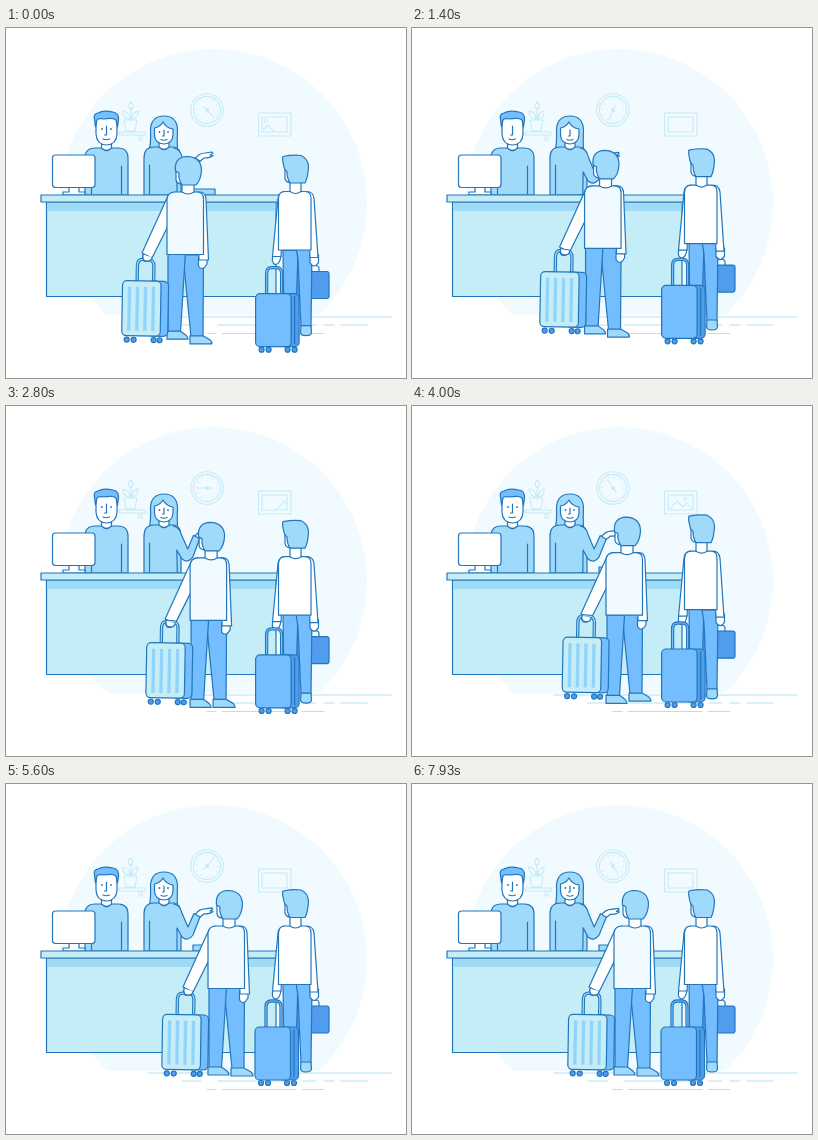
An HTML page that plays this animation: 400x350 px, repeating every 8 s.

```html
<!DOCTYPE html>
<html lang="en">
<head>
<meta charset="utf-8">
<title>Reception desk</title>
<style>
  html, body { margin: 0; width: 100%; height: 100%; overflow: hidden; background: #fff; }
  svg { display: block; width: 100vw; height: 100vh; }
  .ink { stroke: #2276bc; stroke-width: 1.2; stroke-linecap: round; stroke-linejoin: round; fill: none; }
  .faint { stroke: #c6eaf8; stroke-width: 1.1; stroke-linecap: round; stroke-linejoin: round; fill: none; }
  .ink .w { fill: #fff; }
  .ink .mist { fill: #f1faff; }
  .ink .sky { fill: #a0dafb; }
  .ink .pale { fill: #c5edf8; }
  .ink .blue { fill: #74bdff; }
  .ink .deep { fill: #519cec; }
  .bare { stroke: none; }
</style>
</head>
<body>
<svg viewBox="0 0 400 350" xmlns="http://www.w3.org/2000/svg">
  <defs>
    <clipPath id="ground"><rect width="400" height="287"/></clipPath>
    <clipPath id="canvas"><rect x="256" y="89" width="25" height="15"/></clipPath>
  </defs>

  <circle cx="207" cy="175" r="154" fill="#f1fbff" clip-path="url(#ground)"/>

  <g class="faint">
    <!-- clock -->
    <circle cx="201" cy="82" r="16.3"/>
    <circle cx="201" cy="82" r="13.6"/>
    <circle cx="201" cy="82" r="11" stroke-dasharray="1 4.76" stroke-linecap="butt" stroke-width="1.5"/>
    <g id="clockHand"><path d="M201 87V72"/><circle cx="201" cy="82" r="1.3" fill="#c6eaf8"/></g>
    <!-- picture -->
    <rect x="252.500" y="85" width="32.500" height="23"/>
    <rect x="256" y="89" width="25" height="15"/>
    <g clip-path="url(#canvas)"><g id="mountains">
      <path d="M257 104L265 95L271 101L275 97L281 104"/><circle cx="273" cy="93" r="1.500"/>
    </g></g>
    <!-- shelf and plant -->
    <path d="M113 104H139V107H113ZM133 107V112H136V107M118 92H131L129 103H120Z"/>
    <g id="plant">
      <path d="M125 92V80M125 82C121 79 123 76 125 74C127 76 129 79 125 82M124 91C117 90 117 86 117 83C122 84 124 87 124 91M126 91C132 90 132 86 132 83C127 84 126 87 126 91"/>
    </g>
    <!-- floor -->
    <path d="M142 289H385M176 297H195M212 297H285M297 297H310M318 297H328M335 297H361M201 305.500H210M216 305.500H290M296 305.500H318" stroke="#b3e2f6"/>
  </g>

  <!-- clerk -->
  <g class="ink">
    <path class="sky" d="M79 167V130Q79 120 89 120H112Q122 120 122 130V167Z"/>
    <path d="M85.500 138V166M115.500 138V166"/>
    <path class="w" d="M95.500 113V120Q100.500 125 105.500 120V113Z"/>
    <path class="w" d="M90 90V106Q90.500 116.500 100.500 117Q110.500 116.500 111 106V90Z"/>
    <path class="blue" d="M89.500 99L88.500 91Q87 86 92 85Q97 82 107 84Q113 85 112.500 92L111.500 99L110 92Q107 89.500 98 91Q92 90 91 92Z"/>
    <path d="M100.500 98V107H98.500M97 111Q100 112.500 103.500 111"/>
    <g class="eyes bare" fill="#2276bc"><circle cx="96" cy="101" r="0.900"/><circle cx="105" cy="101" r="0.900"/></g>
  </g>

  <!-- receptionist -->
  <g class="ink">
    <path class="sky" d="M143.500 121Q145 114 144.500 102Q145 88 158 88Q171 88 171.500 102Q171 114 171.500 121Z"/>
    <path class="sky" d="M138 167V130Q138 119 148 119H168Q175 120 175 130V167Z"/>
    <path class="w" d="M153 113V119Q158 124 163 119V113Z"/>
    <path class="w" d="M148.500 100V107Q149 115.500 158 116Q166.500 115.500 167 107V101Q160 100 157 94Q154 99 148.500 100Z"/>
    <path d="M158 102V108H156.500M155 111.500Q158 113 161 111.500M143.500 137V166"/>
    <g class="eyes bare" fill="#2276bc"><circle cx="153.500" cy="104" r="0.900"/><circle cx="162" cy="104" r="0.900"/></g>
    <g id="wave">
      <path class="w" d="M189 131Q193 125 199 125L206 124Q208 125 204 127L207 127.500Q204 130 198 130L193 134Z"/>
      <path class="sky" d="M168 120Q174 121 176 129L182 143L188 129.500L194 133L187 151Q182 158 176 153L171 144V167H168"/>
    </g>
  </g>

  <!-- desk -->
  <g class="ink">
    <path class="w" d="M63 159V164H57V167H79V164H73V159Z"/>
    <rect class="w" x="46.500" y="127" width="42.500" height="32.500" rx="3"/>
    <path class="sky" d="M187 161H209V167H187Z"/>
    <path class="pale" d="M40.500 174H270V268.500H40.500Z"/>
    <path class="bare" fill="#9fdbf7" d="M41.100 175H269.300V183H41.100Z"/>
    <path class="pale" d="M35 167H276V174H35Z"/>
  </g>

  <!-- guest with the striped case -->
  <g class="ink" id="guestA">
    <g id="legAR">
      <path class="blue" d="M217 203H238.500L238 285H226L219 214Z"/>
      <path class="sky" d="M225 292V284H238L245 288Q247 290 247 292Z"/>
    </g>
    <g id="legAL">
      <path class="blue" d="M203 203H220.500L215.500 284H203Z"/>
      <path class="sky" d="M202 291V283H215.500L221 287Q223 289 223 291Z"/>
    </g>
    <path class="w" d="M233.500 207V216Q237.500 222 242 214V207Z"/>
    <path class="w" d="M232 142H235Q240.500 142 241 149L243.500 210H234Z"/>
    <path class="w" d="M179 203Q176 208 179 211Q184 213 187 207L188 203Z"/>
    <path class="w" d="M210 142Q204 142 202 148L177 203L187 208L205 172Z"/>
    <path class="mist" d="M202 204.500V149Q203 142 210 142H232Q238.500 142 238.500 149V204.500Z"/>
    <path class="w" d="M217 129V142Q223 146 229 142V129Z"/>
    <path class="w" d="M211 118V130Q212 134 217 134H222V118Z"/>
    <path class="sky" d="M210.500 121Q209 107 222 106.500Q236 107 236.500 120Q236 130 231 135H217Q213 129 214 123Z"/>
  </g>
  <g class="ink" id="caseA">
    <path id="grip" d="M171.500 232V216Q171.500 209.500 177 209.500H182Q188 209.500 188 216V232" stroke-width="3.300"/>
    <path d="M171.500 232V216Q171.500 209.500 177 209.500H182Q188 209.500 188 216V232" stroke="#a0dafb" stroke-width="1.200"/>
    <g class="deep"><circle cx="162" cy="290" r="2.500"/><circle cx="169" cy="290" r="2.500"/><circle cx="189" cy="290" r="2.500"/><circle cx="195" cy="290" r="2.500"/></g>
    <rect class="blue" x="183" y="231" width="20" height="55" rx="4.500"/>
    <rect class="pale" x="157" y="231" width="38.500" height="55" rx="4.500"/>
    <path d="M164 237V281M172 237V281M180 237V281M188 237V281" stroke="#92d3fa" stroke-width="3.300" stroke-linecap="butt"/>
  </g>
  <g class="ink" id="fingers"><path class="w" d="M178 205Q177 211 182 211Q187 211 187 207"/></g>

  <!-- guest with the briefcase -->
  <g class="ink" id="guestB">
    <path d="M300 222V219Q300 216 304 216H309Q313 216 313 219V222"/>
    <rect class="deep" x="287" y="222" width="36" height="27" rx="2.500"/>
    <g id="legBL">
      <path class="blue" d="M277 199H292L289.500 280H278Z"/>
      <path class="sky" d="M278 279H289.500V285Q284 290 278 285Z"/>
    </g>
    <g id="legBR">
      <path class="blue" d="M290 199H306L305 279H295L292 212Z"/>
      <path class="sky" d="M295 278H305L305.500 285Q305 288 300 288Q295 288 294.500 285Z"/>
    </g>
    <path class="w" d="M304 205V213Q308 220 312.500 213V205Z"/>
    <path class="w" d="M301 142Q307 142 308 149L312 208H304Z"/>
    <path class="w" d="M267 206Q265 213 269 215Q274 215 275 206Z"/>
    <path class="w" d="M279 142Q273 142 272 149L266.500 207H275Z"/>
    <path class="w" d="M272.500 200.500V149Q273 142 279 142H299Q305 142 305 149V200.500Z"/>
    <path class="w" d="M284 129V142Q289.500 146 295 142V129Z"/>
    <path class="w" d="M279 117V129Q280 133 284 133H290V117Z"/>
    <path class="sky" d="M277.500 115Q276 109 277 107Q287 105 295 106Q302 109 302.500 117Q302 128 299 133.500H284Q281 129 281 122Q278 120 277.500 115Z"/>
  </g>
  <g class="ink" id="caseB">
    <path d="M260 243V223Q260 217 265 217H270Q275 217 275 223V243" stroke-width="3.300"/>
    <path d="M260 243V223Q260 217 265 217H270Q275 217 275 223V243" stroke="#74bdff" stroke-width="1.200"/>
    <g class="deep"><circle cx="255" cy="299" r="2.500"/><circle cx="262" cy="299" r="2.500"/><circle cx="281" cy="299" r="2.500"/><circle cx="288" cy="299" r="2.500"/></g>
    <rect class="deep" x="272" y="243" width="20.500" height="53" rx="4.500"/>
    <path d="M288 246V293"/>
    <rect class="blue" x="249" y="243" width="35.500" height="53" rx="4.500"/>
  </g>
</svg>

<script>
  const LOOP = 8, FPS = 15, STRIDE = 1.643;
  const $ = id => document.getElementById(id);
  const set = (id, value) => $(id).setAttribute('transform', value);
  const move = (id, x, y) => set(id, `translate(${x.toFixed(2)} ${y.toFixed(2)})`);

  // Piecewise linear value through [time, value] points.
  function track(points, t) {
    const i = points.findIndex(p => p[0] > t);
    if (i < 0) return points[points.length - 1][1];
    if (i === 0) return points[0][1];
    const [t0, a] = points[i - 1], [t1, b] = points[i];
    return a + (b - a) * (t - t0) / (t1 - t0);
  }

  const bodyX = [[0, -41], [4, -8], [4.95, 0]];
  const bodyY = [[0, 22], [4, 4.7], [4.95, 0]];
  const followerY = [[0, 21.5], [4.7, 0]];
  const caseX = [[0, -40], [4, -5.5], [4.7, -1], [5, 0]];
  const caseY = [[0, 22], [1.4, 13], [2.8, 6], [4, 0.5], [4.6, -0.3]];
  const trolleyY = [[0, 22.7], [3.8, 0]];
  const sceneX = [[0, -13], [1, -28], [1.01, 30], [2.8, 13], [4, 0], [4.73, -27], [6.6, -28], [6.61, 30], [8, 22]];
  const blinks = [1.3, 4.9, 6.4, 7.4];

  function draw(t) {
    const walking = Math.min(1, Math.max(0, (4.95 - t) / 0.3));
    const step = -1.8 * Math.cos(2 * Math.PI * t / STRIDE) * walking;
    const x = track(bodyX, t), y = track(bodyY, t);
    const sway = Math.sin((t - 5.7) * 1.5) * (1 - walking);

    move('guestA', x, y);
    move('legAL', 0, step);
    move('legAR', 0, -step);
    move('fingers', x, y);
    set('caseA', `translate(${track(caseX, t)} ${track(caseY, t)}) rotate(${(1 + sway * 0.6).toFixed(2)} 180 210)`);

    move('guestB', 0, track(followerY, t));
    move('legBL', 0, -step);
    move('legBR', 0, step);
    move('caseB', 0.6 * walking, track(trolleyY, t));

    set('clockHand', `rotate(${138 + 47 * t} 201 82)`);
    move('mountains', track(sceneX, t), 0);
    set('plant', `rotate(${2 * Math.sin(t * 2)} 125 92)`);
    set('wave', `rotate(${1.2 * Math.sin(t * 1.7)} 178 153)`);

    const shut = blinks.some(b => t >= b && t < b + 0.13);
    for (const eyes of document.querySelectorAll('.eyes')) eyes.style.opacity = shut ? 0 : 1;
  }

  const start = performance.now();
  function tick() {
    const t = (performance.now() - start) / 1000 % LOOP;
    draw(Math.floor(t * FPS) / FPS);
    requestAnimationFrame(tick);
  }
  tick();
</script>
</body>
</html>
```
